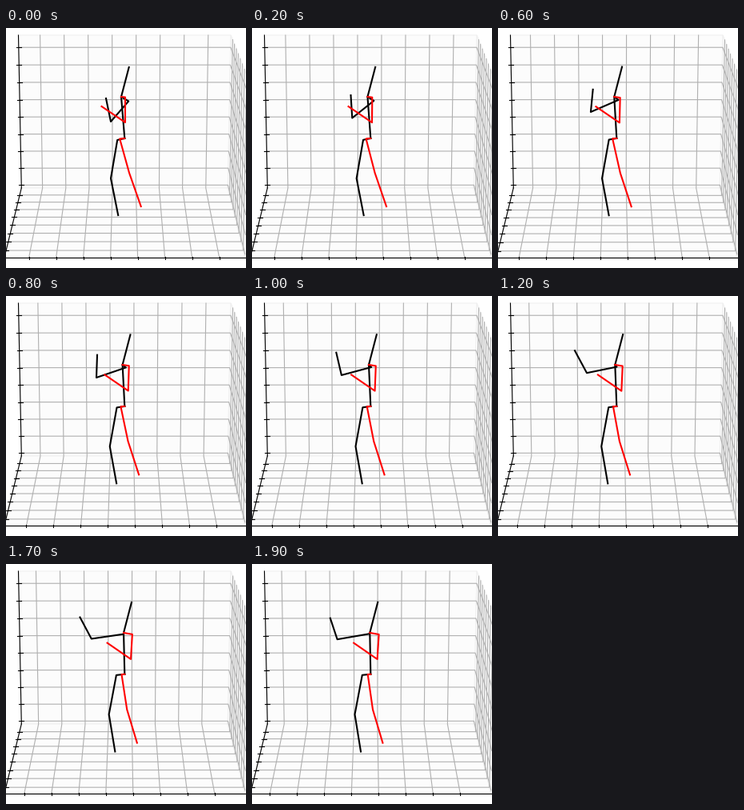
Recreate the animation shown at these times as a matplotlib script. Size 300 by 300 pixels, loop 2000 ms.

```python
import numpy as np
import matplotlib.pyplot as plt
from matplotlib.animation import FuncAnimation

FRAMES, INTERVAL = 20, 100
GRID = dict(color="#b0b0b0", lw=0.8, zorder=2)
AXIS = dict(color="black", lw=0.8, zorder=3)

# Room seen in one-point perspective
VP = np.array([148.3, -325.0])
TOP, BOTTOM = 9.0, 200.0
HALF_TOP, HALF_BOTTOM = 132.8, 129.0
NEAR = 150.4 / HALF_BOTTOM
X_STEP, X_COUNT = 34.0, 8
DEPTH_COUNT = 8

fig = plt.figure(figsize=(3, 3), dpi=100, facecolor="white")
ax = fig.add_axes([0, 0, 1, 1])
ax.set_xlim(0, 300)
ax.set_ylim(300, 0)
ax.axis("off")


def wall(u, y):
    """Point on the back wall; u runs from -1 (left) to 1 (right)."""
    half = HALF_TOP + (HALF_BOTTOM - HALF_TOP) * (y - TOP) / (BOTTOM - TOP)
    return np.array([VP[0] + u * half, y])


def pull(p, r):
    """Bring a back wall point towards the viewer by scale r."""
    return VP + (p - VP) * r


def line(pts, **style):
    return ax.plot(*np.transpose(pts), **style)[0]


def lines(n, **style):
    return [line([(0, 0)], **style) for _ in range(n)]


def put(ln, *pts):
    ln.set_data(*np.transpose(pts))


TL, TR = wall(-1, TOP), wall(1, TOP)
BL, BR = wall(-1, BOTTOM), wall(1, BOTTOM)
FL, FR, FTR = pull(BL, NEAR), pull(BR, NEAR), pull(TR, NEAR)


def draw_room():
    for quad in ([TL, TR, BR, BL], [BL, BR, FR, FL], [TR, FTR, FR, BR]):
        ax.fill(*np.transpose(quad), fc="#fcfcfc", ec="#f0f0f0", lw=0.8, zorder=1)
    for k in range(9):
        y = 196.3 - 21.06 * k - 0.056 * k * k
        left, right = wall(-1, y), wall(1, y)
        line([left, right, pull(right, NEAR)], **GRID)
        line([left - (3, 0), left + (3, 0)], **AXIS)
    for a, b in ((TL, BL), (BL, FL), (FL, FR)):
        line([a, b], **AXIS)


def smooth(times, pts):
    """Cubic Hermite path through timed points."""
    t, p = np.array(times, float), np.array(pts, float)
    m = np.gradient(p, t, axis=0)

    def at(f):
        i = min(np.searchsorted(t, f, side="right") - 1, len(t) - 2)
        h = t[i + 1] - t[i]
        s = (f - t[i]) / h
        return ((1 + 2 * s) * (1 - s) ** 2 * p[i] + s * (1 - s) ** 2 * h * m[i]
                + s * s * (3 - 2 * s) * p[i + 1] + s * s * (s - 1) * h * m[i + 1])
    return at


# Joints that drift slowly: start and end of the loop
DRIFT = {
    "head": ((153.7, 49), (157.2, 47.8)),
    "neck": ((144, 86), (147.3, 86)),
    "root": ((148.3, 138), (148.3, 137.8)),
    "hip_l": ((139.2, 140), (137.8, 138.8)),
    "knee_l": ((131, 188), (128.5, 188)),
    "foot_l": ((140.2, 234), (136, 234.5)),
    "hip_r": ((142.2, 138.5), (144.7, 138)),
    "knee_r": ((154, 181), (151, 182)),
    "foot_r": ((168.7, 223), (163.4, 223.6)),
    "shoulder_l": ((153.2, 91.5), (146.5, 87.3)),
    "shoulder_r": ((149, 86.5), (158.6, 88)),
    "elbow_r": ((149, 118), (156.6, 119)),
    "hand_r": ((119.5, 98), (127.2, 98.7)),
}
KEYS = [0, 4, 8, 12, 14, 17, 19]
elbow = smooth(KEYS, [(131, 117), (120, 108.3), (113, 102), (111, 96.2),
                      (108.8, 94), (106.8, 93.5), (106.6, 94.2)])
hand = smooth(KEYS, [(125, 88), (121.5, 80.3), (114, 73.7), (96, 68.3),
                     (89, 66.5), (92.5, 66.6), (97.8, 67.7)])

BONES = [
    ("black", "root neck head"),
    ("black", "root hip_l knee_l foot_l"),
    ("black", "neck shoulder_l elbow_l hand_l"),
    ("red", "root hip_r knee_r foot_r"),
    ("red", "neck shoulder_r elbow_r hand_r"),
]


def pose(f, p):
    joints = {n: np.array(a) * (1 - p) + np.array(b) * p
              for n, (a, b) in DRIFT.items()}
    joints["elbow_l"], joints["hand_l"] = elbow(f), hand(f)
    return joints


draw_room()
x_grid, x_ticks = lines(X_COUNT, **GRID), lines(X_COUNT, **AXIS)
y_grid, y_ticks = lines(DEPTH_COUNT, **GRID), lines(DEPTH_COUNT, **AXIS)
limbs = [line([(0, 0)], color=c, lw=1.5, zorder=5) for c, _ in BONES]


def update(f):
    s = f / (FRAMES - 1)
    p = 1.3 * s - 0.3 * s * s
    for k in range(X_COUNT):
        x = 28.6 - 6.3 * p + X_STEP * k
        u = (x - VP[0]) / (HALF_BOTTOM * NEAR)
        put(x_grid[k], wall(u, TOP), wall(u, BOTTOM), (x, FL[1]))
        put(x_ticks[k], (x, FL[1] - 1.5), (x, FL[1] + 1.5))

    shift = 0.12 - 0.1 * (1 - p) ** 2
    for k in range(DEPTH_COUNT):
        r = 1 / (1 - (k + 1 + shift) * 0.01614)
        left = pull(BL, r)
        put(y_grid[k], left, pull(BR, r), pull(TR, r))
        put(y_ticks[k], left - (3, 0), left + (3, 0))

    joints = pose(f, p)
    for limb, (_, names) in zip(limbs, BONES):
        put(limb, *(joints[n] for n in names.split()))
    return x_grid + x_ticks + y_grid + y_ticks + limbs


anim = FuncAnimation(fig, update, frames=FRAMES, interval=INTERVAL,
                     init_func=lambda: update(0), repeat=True, repeat_delay=0)
plt.show()
```
